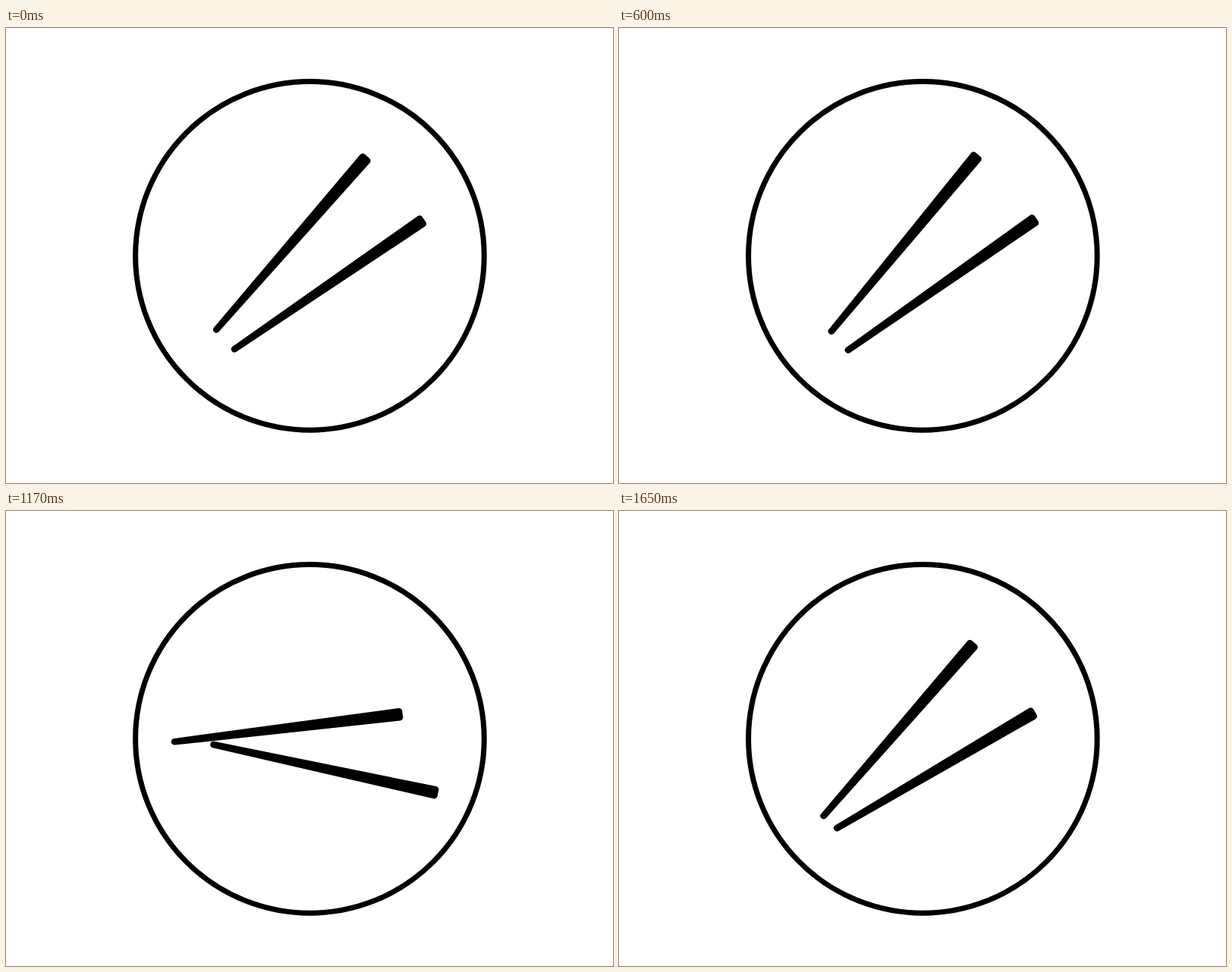
Write an HTML page that moves like this. It is 800 px wide and 600 px high and loops after 1.68 s.

```html
<!DOCTYPE html>
<html lang="en">
<head>
<meta charset="utf-8">
<title>Chopsticks</title>
<style>
  html, body { margin: 0; width: 100%; height: 100%; overflow: hidden; background: #fff; }
  svg { display: block; width: 100%; height: 100%; }
</style>
</head>
<body>
<svg viewBox="0 0 800 600">
  <defs>
    <path id="stick" d="M-149.2 0L149.2 -4V4Z" stroke="#000" stroke-width="8.7" stroke-linejoin="round"/>
  </defs>
  <circle cx="400.4" cy="300.4" r="229.8" fill="none" stroke="#000" stroke-width="7"/>
  <use href="#stick" class="stick"/>
  <use href="#stick" class="stick"/>
</svg>
<script>
const LOOP = 1680, STEP = 30;
const SPIN_START = 1080, SPIN_END = 1500;
const swingTimes = [0, 270, 540, 825, SPIN_START];

// Angles are in degrees, counter-clockwise from horizontal.
const sticks = [
  { x: 375.2, y: 285.1, swing: [49, 33, 52.4, 33, 52.4], end: 49 - 360 },
  { x: 424.3, y: 339.2, swing: [34.4, 49.8, 33.2, 49.8, 33.2], end: 30.4 - 360 },
];
const nodes = document.querySelectorAll('.stick');

const clamp = v => Math.min(1, Math.max(0, v));
const mix = (a, b, p) => a + (b - a) * p;
const easeSine = p => (1 - Math.cos(Math.PI * p)) / 2;
const easeSpin = p => p * (0.37 + p * (1.1 - 0.47 * p));

function angleAt(stick, t) {
  if (t >= SPIN_START) {
    const p = clamp((t - SPIN_START) / (SPIN_END - SPIN_START));
    return mix(stick.swing[4], stick.end, easeSpin(p));
  }
  const i = swingTimes.findIndex(time => t < time) - 1;
  const p = (t - swingTimes[i]) / (swingTimes[i + 1] - swingTimes[i]);
  return mix(stick.swing[i], stick.swing[i + 1], easeSine(p));
}

function draw(now) {
  const t = Math.floor((now % LOOP) / STEP) * STEP;
  // While spinning, the pivot moves slightly off the stick's middle.
  const shift = clamp((t - SPIN_START) / 160);
  sticks.forEach((stick, i) => {
    const angle = angleAt(stick, t);
    const rad = angle * Math.PI / 180;
    const x = stick.x + shift * (-5.2 - 3.65 * Math.cos(rad));
    const y = stick.y + shift * (1.6 + 3.65 * Math.sin(rad));
    nodes[i].setAttribute('transform', `translate(${x} ${y}) rotate(${-angle})`);
  });
}

const start = performance.now();
function tick() {
  draw(performance.now() - start);
  requestAnimationFrame(tick);
}
tick();
</script>
</body>
</html>
```
